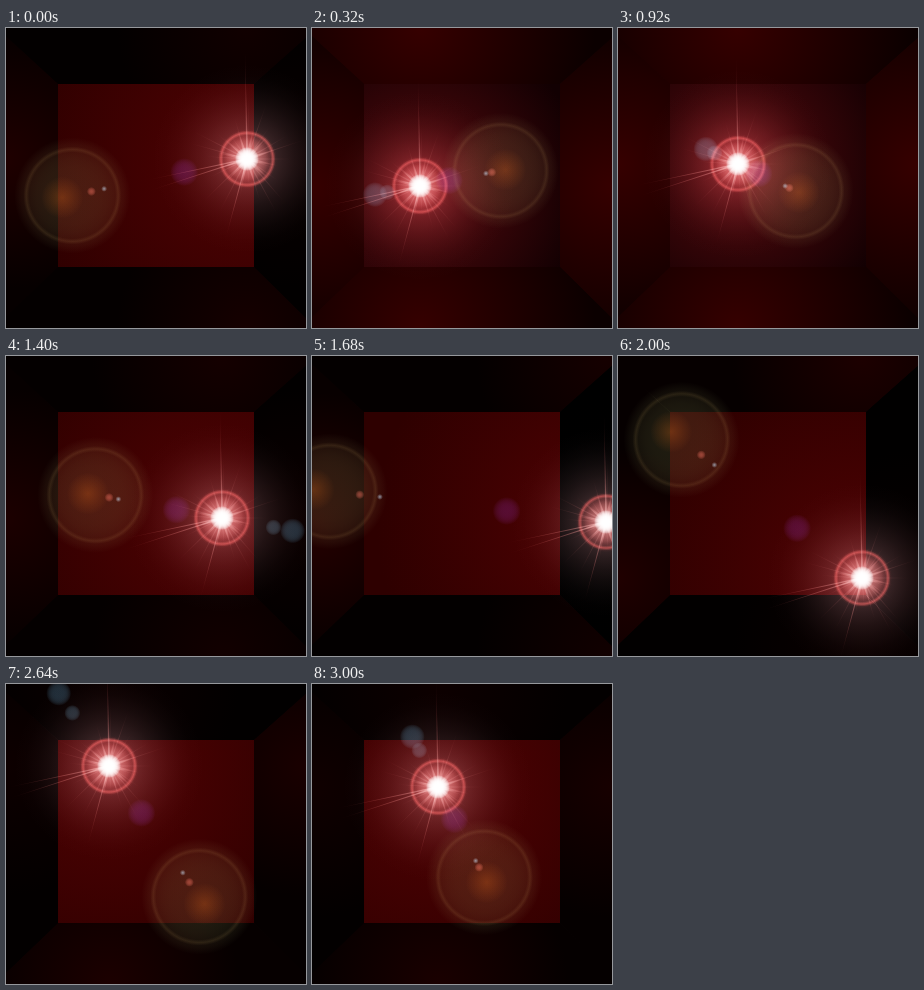
An HTML page with a canvas that plays this animation: 300x300 px, repeating every 3.04 s.

```html
<!DOCTYPE html>
<html lang="en">
<head>
<meta charset="utf-8">
<title>Light in a red room</title>
<style>
html, body { margin: 0; width: 100%; height: 100%; overflow: hidden; background: #000; }
canvas { display: block; width: 100vw; height: 100vh; }
</style>
</head>
<body>
<canvas id="stage" width="300" height="300"></canvas>
<script>
const ctx = document.getElementById('stage').getContext('2d');
const LOOP = 3040, STEP = 40, SIZE = 300, MID = 150;

// Key places of the light: time, x, y
const path = [
  [0, 241, 131], [320, 108, 158], [600, 94, 118], [920, 120, 136], [1400, 216, 162],
  [1680, 294, 166], [2000, 244, 222], [2320, 102, 146], [2640, 103, 82], [3000, 126, 103]
];

const mix = (a, b, k) => a + (b - a) * k;
const blend = (a, b, k) => a.map((v, i) => mix(v, b[i], k));
const rgb = (c, a = 1) => `rgba(${c.map(Math.round).join(',')},${a})`;
const ease = (from, to, t) => {
  const u = Math.max(0, Math.min(1, (t - from) / (to - from)));
  return u * u * (3 - 2 * u);
};

// Smooth curve through the key places
function lightAt(t) {
  const last = path.length - 1;
  let i = 0;
  while (i < last - 1 && t >= path[i + 1][0]) i++;
  const a = path[i], b = path[i + 1], span = b[0] - a[0], u = (t - a[0]) / span;
  return [1, 2].map(axis => {
    const slope = j => {
      const p = path[Math.max(0, j - 1)], q = path[Math.min(last, j + 1)];
      return (q[axis] - p[axis]) / (q[0] - p[0]) * span;
    };
    const e = u * u * (3 - 2 * u);
    return mix(a[axis], b[axis], e) +
      u * (1 - u) * ((1 - u) * slope(i) - u * slope(i + 1));
  });
}

function radial(x, y, r, inner, outer) {
  const g = ctx.createRadialGradient(x, y, 0, x, y, r);
  g.addColorStop(0, inner);
  g.addColorStop(1, outer);
  return g;
}

function fillDisc(x, y, r, paint) {
  ctx.fillStyle = paint;
  ctx.beginPath();
  ctx.arc(x, y, r, 0, Math.PI * 2);
  ctx.fill();
}

// Disc whose strength falls off as (1 - u^hold)^power
function glow(x, y, r, color, alpha, power = 1, hold = 1) {
  const g = ctx.createRadialGradient(x, y, 0, x, y, r);
  for (let u = 0; u <= 1; u += 0.125) {
    g.addColorStop(u, rgb(color, alpha * (1 - u ** hold) ** power));
  }
  fillDisc(x, y, r, g);
}

// Soft circle line
function ring(x, y, r, width, color, alpha) {
  const outer = r + width, g = ctx.createRadialGradient(x, y, r - width, x, y, outer);
  g.addColorStop(0, rgb(color, 0));
  g.addColorStop(0.5, rgb(color, alpha));
  g.addColorStop(1, rgb(color, 0));
  ctx.lineWidth = width * 2;
  ctx.strokeStyle = g;
  ctx.beginPath();
  ctx.arc(x, y, r, 0, Math.PI * 2);
  ctx.stroke();
}

function streak(x, y, degrees, length, alpha, width = 0.8) {
  ctx.save();
  ctx.translate(x, y);
  ctx.rotate(degrees * Math.PI / 180);
  ctx.fillStyle = radial(0, 0, length, rgb([255, 170, 165], alpha), rgb([255, 90, 90], 0));
  ctx.beginPath();
  ctx.moveTo(0, -width);
  ctx.lineTo(length, 0);
  ctx.lineTo(0, width);
  ctx.fill();
  ctx.restore();
}

function room(x, y, front) {
  const inner = [[52, 56], [248, 56], [248, 239], [52, 239]];
  const outer = [[-20, -10], [320, -8], [320, 310], [-20, 308]];
  const spots = [[x, 0], [SIZE, y], [x, SIZE], [0, y]];
  const reach = [y, SIZE - x, SIZE - y, x];

  spots.forEach((spot, i) => {
    const j = (i + 1) % 4;
    const red = mix(Math.max(0, reach[i]) * 0.13, 54, front);
    ctx.fillStyle = radial(...spot, mix(130, 175, front),
      rgb([red, 0, 0]), rgb([red * 0.2, 0, 0]));
    ctx.beginPath();
    [outer[i], outer[j], inner[j], inner[i]].forEach(p => ctx.lineTo(...p));
    ctx.fill();
  });

  ctx.fillStyle = radial(x, y, mix(230, 165, front),
    rgb(blend([80, 2, 3], [88, 10, 14], front)),
    rgb(blend([46, 0, 0], [18, 0, 2], front)));
  ctx.fillRect(52, 56, 196, 183);
}

function ghosts(x, y) {
  const along = k => [mix(MID, x, k), mix(MID, y, k)];
  const big = along(-0.92);
  glow(...big, 58, [50, 54, 32], 0.5, 1, 4);
  ring(...big, 46, 3, [75, 62, 34], 0.3);
  glow(...along(-1.03), 21, [150, 62, 8], 0.4);
  glow(...along(-0.71), 4.5, [210, 85, 75], 0.55, 1, 2);
  glow(...along(-0.57), 3, [150, 185, 205], 0.75);
  glow(...along(0.31), 14, [70, 28, 115], 0.42, 1, 3);
  glow(...along(1.78), 8, [65, 100, 120], 0.45, 1, 4);
  glow(...along(2.07), 12.5, [55, 95, 118], 0.48, 1, 4);
}

function flare(x, y, front) {
  glow(x, y, 95, blend([165, 115, 120], [205, 80, 86], front), 0.6, 1.9);
  glow(x, y, 30, [235, 55, 55], 0.45, 1, 3);
  ring(x, y, 26, 2.5, [255, 75, 72], 0.55);

  streak(x, y, -91, 112, 0.5);
  [105, 162, 168].forEach(a => streak(x, y, a, a < 120 ? 85 : 105, 0.55));
  for (let i = 0; i < 24; i++) {
    streak(x, y, i * 15 + 5 * Math.sin(i * 7), 50 + 18 * Math.sin(i * 5), 0.25);
  }
  for (let i = 0; i < 12; i++) streak(x, y, i * 30 + 12, 32, 0.6, 2);

  glow(x, y, 22, [255, 130, 125], 0.75);
  glow(x, y, 12, [255, 255, 255], 1, 1, 4);
}

function draw(t) {
  const [x, y] = lightAt(t);
  const front = ease(40, 320, t) - ease(960, 1360, t);
  ctx.globalCompositeOperation = 'source-over';
  room(x, y, front);
  ctx.globalCompositeOperation = 'screen';
  ghosts(x, y);
  flare(x, y, front);
}

const start = performance.now();
function tick() {
  const t = (performance.now() - start) % LOOP;
  // The first pose holds for two steps
  draw(t < 2 * STEP ? 0 : Math.floor(t / STEP) * STEP);
  requestAnimationFrame(tick);
}
tick();
</script>
</body>
</html>
```
